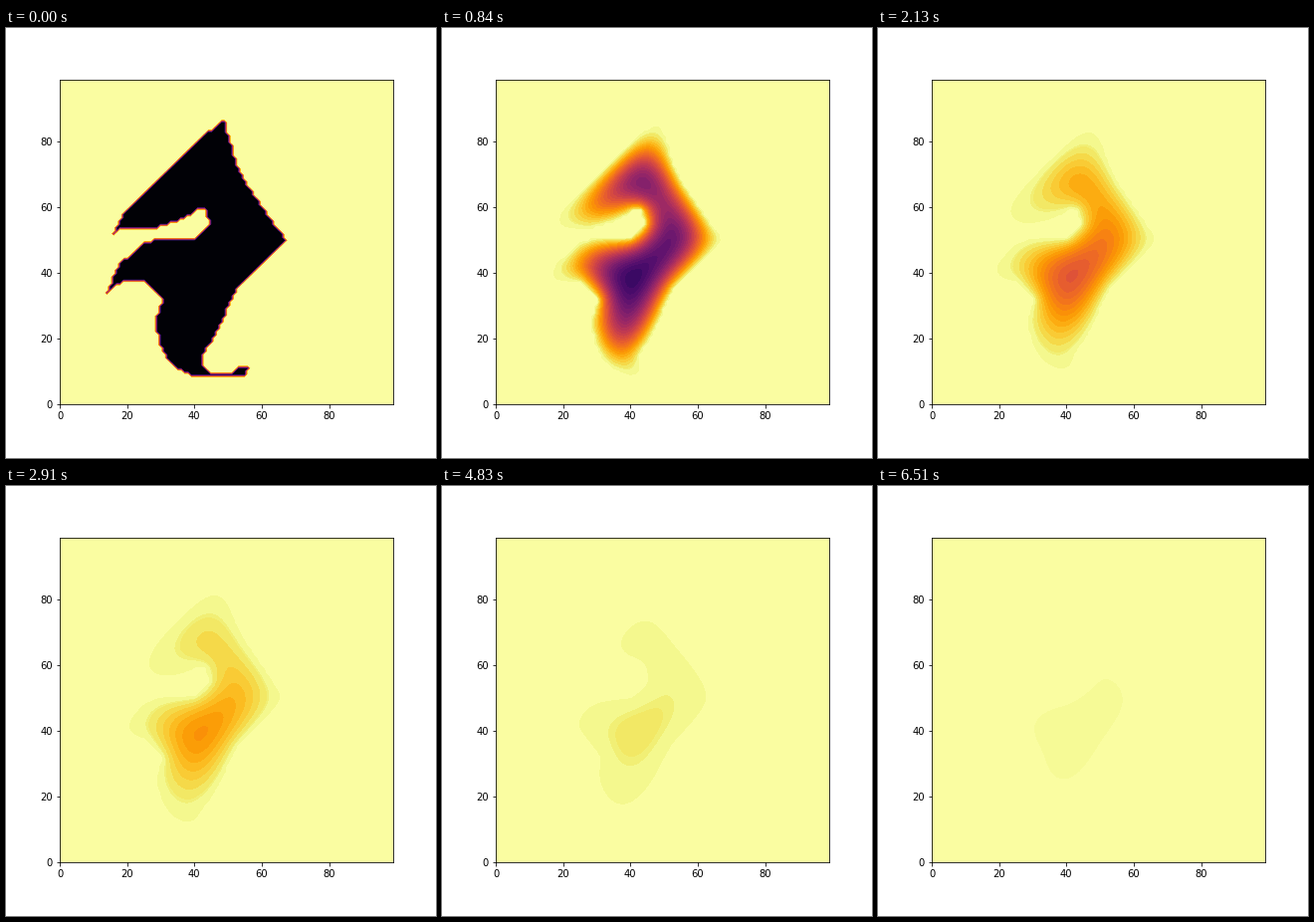
A matplotlib script that plays this animation: 432x432 px, repeating every 8000 ms.

```python
import matplotlib.pyplot as plt
import numpy as np
from matplotlib.animation import FuncAnimation
from matplotlib.path import Path

N = 100
LOOP, STEP = 8000, 32
PAUSE, REST = 5430, 6420   # ms: still from PAUSE on, one last jump at REST
RATE = 0.1                 # diffusion number of one solver step
END_PEAK = 0.022           # coldness left at REST

# Key points of the cold body in grid units, clockwise from the top.
BODY = [
    (48.7, 87), (50.3, 82), (52.6, 73), (57, 65.2), (67.4, 50), (52.7, 35),
    (48.3, 25.3), (42.6, 14.3), (42.6, 11.8), (45.2, 9.6), (51.4, 9.6),
    (53, 11.4), (56.4, 11.4), (55, 8.5), (39, 8.6), (33, 12), (29.2, 19),
    (28.6, 26), (30.4, 32.3), (24.8, 37.3), (18.8, 37.4), (13.6, 33.6),
    (17.4, 42.8), (25, 49.2), (29, 50.5), (40.2, 50.5), (44.3, 55),
    (42.8, 60.3), (37.4, 56.8), (28.4, 53.7), (18, 53.5), (15.5, 51.5),
    (18.6, 58), (41.2, 80.8),
]


def body_mask():
    y, x = np.mgrid[:N, :N]
    grid = np.column_stack((x.ravel(), y.ravel()))
    return Path(BODY).contains_points(grid).reshape(N, N)


def diffuse(mask):
    """Heat flows in from the warm surroundings, which stay fixed at 1."""
    cold = mask.astype(np.float32)
    states = [1 - cold]
    while cold.max() > END_PEAK and len(states) < 4000:
        around = sum(np.roll(cold, s, axis) for s in (-1, 1) for axis in (0, 1))
        cold = (cold + RATE * (around - 4 * cold)) * mask
        states.append(1 - cold)
    return states


def clock(t):
    if t < PAUSE:
        return t
    return PAUSE if t < REST else REST


states = diffuse(body_mask())

# Band edges as distance from the warm value, finer near it.
edges = np.r_[-0.001, 0.01, 0.043, 0.052, np.arange(0.08, 0.99, 0.03), 1.001]
levels = 1 - edges[::-1]
cmap = plt.get_cmap("inferno")
colors = [cmap(v) for v in (levels[:-1] + levels[1:]) / 2]

fig = plt.figure(figsize=(6, 6), dpi=72, facecolor="white")
ax = fig.add_axes([0.125, 0.125, 0.775, 0.755])
ax.set(xlim=(0, N - 1), ylim=(0, N - 1),
       xticks=range(0, N, 20), yticks=range(0, N, 20))

shown = {"index": None, "fill": None}


def draw(i):
    index = round(clock(i * STEP) / REST * (len(states) - 1))
    if index == shown["index"]:
        return []
    if shown["fill"] is not None:
        shown["fill"].remove()
    heat = states[index]
    # The outermost band pales as the body warms up.
    colors[-2] = cmap(max(0.975, (heat.min() + 0.99) / 2))
    shown.update(index=index,
                 fill=ax.contourf(heat, levels=levels, colors=colors))
    return []


anim = FuncAnimation(fig, draw, frames=LOOP // STEP, interval=STEP,
                     init_func=lambda: draw(0), repeat=True, repeat_delay=0)
plt.show()
```
